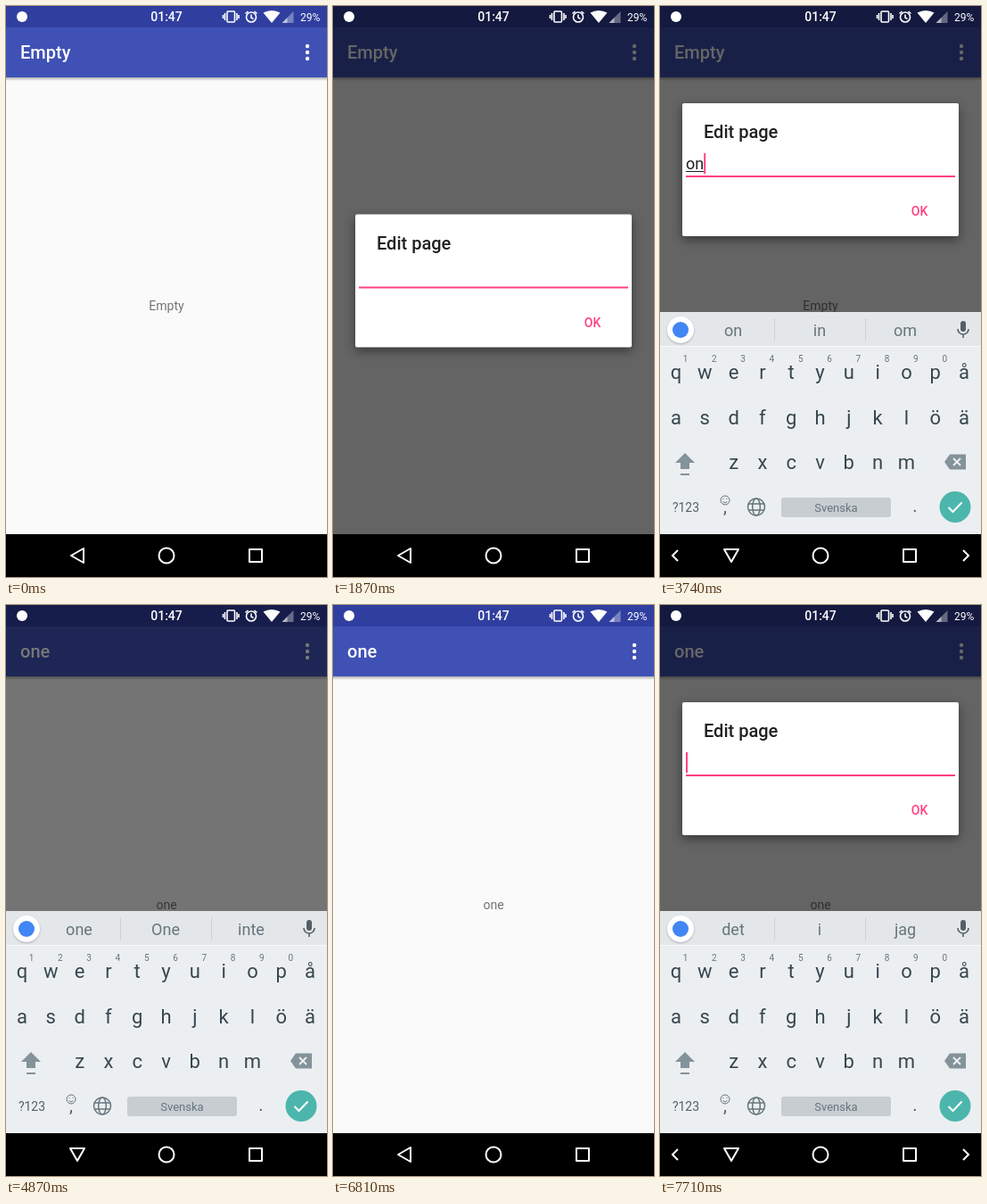
An HTML page for the animation above (8 s loop, 360 px wide and 640 px high).

```html
<!DOCTYPE html>
<html lang="en">
<head>
<meta charset="utf-8">
<title>Edit page</title>
<style>
html, body { margin: 0; width: 100%; height: 100%; overflow: hidden; background: #000; }
svg { display: block; width: 100%; height: 100%; font-family: Roboto, "Noto Sans", sans-serif; }
.mid { text-anchor: middle; }
.bold { font-weight: 500; }
.card { fill: #fff; filter: drop-shadow(0 4px 6px rgba(0, 0, 0, .45)); }
.line { fill: none; stroke-width: 2; stroke-linejoin: round; }
</style>
</head>
<body>
<svg viewBox="0 0 360 640" xmlns="http://www.w3.org/2000/svg">
  <defs>
    <linearGradient id="drop" x1="0" y1="0" x2="0" y2="1">
      <stop offset="0" stop-opacity=".3"/><stop offset="1" stop-opacity="0"/>
    </linearGradient>
  </defs>

  <rect width="360" height="592" fill="#fafafa"/>
  <rect y="80" width="360" height="4" fill="url(#drop)"/>
  <rect y="24" width="360" height="56" fill="#3f51b5"/>
  <rect width="360" height="24" fill="#303f9f"/>
  <g fill="#fff">
    <text id="title" class="bold" x="16" y="59" font-size="20"></text>
    <circle cx="338" cy="45" r="2.2"/><circle cx="338" cy="52" r="2.2"/><circle cx="338" cy="59" r="2.2"/>
  </g>
  <text id="label" class="mid" x="180" y="341" font-size="14" fill="#737373"></text>

  <g id="menu">
    <rect class="card" x="160" y="30" width="196" height="230" rx="2"/>
    <text x="176" y="67" font-size="16" fill="#212121">Edit page</text>
  </g>

  <rect id="scrim" width="360" height="592"/>

  <g id="dialog">
    <rect class="card" x="25" y="109" width="310" height="149" rx="2"/>
    <text class="bold" x="49" y="148" font-size="20" fill="#212121">Edit page</text>
    <text id="typed" x="29" y="183" font-size="18" fill="#212121"></text>
    <rect id="under" x="29" y="185" height="1" fill="#212121"/>
    <rect id="caret" y="165" width="2" height="23" fill="#ff4081"/>
    <rect x="29" y="190" width="302" height="2" fill="#ff4081"/>
    <rect id="ripple" x="267" y="212" width="48" height="36" rx="2" opacity=".15"/>
    <text class="mid bold" x="291" y="235" font-size="14" fill="#ff4081">OK</text>
  </g>

  <g id="board">
    <rect y="343" width="360" height="249" fill="#eceff1"/>
    <rect y="343" width="360" height="38" fill="#e4e7e9"/>
    <rect y="381" width="360" height="1" fill="#f8f9fa"/>
    <path d="M128.5 350v25M230.5 350v25" stroke="#cbd0d3"/>
    <circle cx="23" cy="363" r="15" fill="#fff" style="filter:drop-shadow(0 1px 1px rgba(0,0,0,.25))"/>
    <circle cx="23" cy="363" r="9" fill="#4285f4"/>
    <g id="hints" class="mid" font-size="18" fill="#66757d">
      <text x="82" y="370"></text><text x="179" y="370"></text><text x="275" y="370"></text>
    </g>
    <g fill="#546068">
      <rect x="337" y="353" width="6" height="12" rx="3"/>
      <path d="M334 362a6 6 0 0 0 12 0M340 368v4" class="line" stroke="#546068" style="stroke-width:1.6"/>
    </g>
    <g id="keys" class="mid" font-size="22" fill="#37474f"></g>
    <g fill="#84929a">
      <path d="M28 501l11 11h-6v7h-10v-7h-6zM23 524h10v2h-10z"/>
      <path d="M319 511l6-8.5h18v17h-18z"/>
      <path d="M329 507l8 8m0-8l-8 8" stroke="#eceff1" stroke-width="2"/>
    </g>
    <g class="mid" fill="#546068">
      <text x="29" y="567" font-size="14">?123</text>
      <text x="73" y="568" font-size="20">,</text>
      <text x="286" y="567" font-size="20">.</text>
    </g>
    <g class="line" stroke="#66757d" style="stroke-width:1">
      <circle cx="73" cy="554" r="5"/><path d="M70.5 555.5q2.5 3 5 0M71 552v1M75 552v1"/>
      <g stroke-width="1.5"><circle cx="108" cy="561.5" r="9.5"/><ellipse cx="108" cy="561.5" rx="4.3" ry="9.5"/><path d="M99.5 558h17M99.5 565h17"/></g>
    </g>
    <rect x="136" y="551" width="123" height="22" rx="3" fill="#c7cdd1"/>
    <text class="mid" x="197.5" y="567" font-size="13" fill="#66757d">Svenska</text>
    <circle cx="331" cy="561.5" r="17.5" fill="#4db6ac"/>
    <path class="line" d="M323.5 562l5 5 10-10.5" stroke="#fff"/>
    <g id="press" class="mid">
      <rect x="-16" y="-33" width="32" height="52" rx="2" fill="#d3d8db"/>
      <rect x="-18" y="-84" width="36" height="50" rx="2" fill="#fafafa" style="filter:drop-shadow(0 1px 2px rgba(0,0,0,.3))"/>
      <text y="-51" font-size="26" fill="#37474f"></text>
      <text font-size="22" fill="#37474f"></text>
    </g>
  </g>

  <g fill="#fff">
    <circle cx="18" cy="12" r="6"/>
    <text class="mid bold" x="180" y="17" font-size="14">01:47</text>
    <text x="330" y="16.5" font-size="12">29%</text>
    <g class="line" stroke="#fff" style="stroke-width:1.6">
      <rect x="248" y="6" width="8.5" height="12" rx="1"/>
      <path d="M245.5 8v8M243.5 10v4M259 8v8M261 10v4"/>
      <circle cx="275" cy="12.5" r="5.5"/><path d="M275 9.5v3.5l2.5 1.5M268.5 8.5l3-2.5M281.5 8.5l-3-2.5"/>
    </g>
    <path d="M298 19l-9.5-11.5q9.5-5 19 0z"/>
    <path d="M322.5 6v13h-13z" opacity=".35"/>
    <path d="M315.5 13v6h-6z" opacity=".5"/>
  </g>

  <rect y="592" width="360" height="48"/>
  <g class="line" stroke="#fff">
    <path id="back" d="M73 616l14-8v16z"/>
    <circle cx="180" cy="616" r="8.5"/>
    <rect x="273" y="609" width="14" height="14"/>
    <path id="arrows" d="M20 610l-6 6 6 6M340 610l6 6-6 6"/>
  </g>
</svg>
<script>
const LOOP = 8000, STEP = 75;
const $ = id => document.getElementById(id);
const set = (id, attrs) => { for (const k in attrs) $(id).setAttribute(k, attrs[k]); };
const show = (id, on) => set(id, { visibility: on ? 'visible' : 'hidden' });
const ramp = (t, a, b) => Math.min(1, Math.max(0, (t - a) / (b - a)));
const ease = k => k * k * (3 - 2 * k);
const within = (t, a, b) => t >= a && t < b;

// Letter keys: row text, first column, baseline
const keyX = col => 18 + 32.3 * col;
const spots = {};
let keys = '';
[['qwertyuiopå', 0, 418], ['asdfghjklöä', 0, 468.5], ['zxcvbnm', 2, 519]].forEach(([row, first, y], r) => {
  [...row].forEach((c, i) => {
    const x = keyX(first + i);
    spots[c] = [x, y];
    keys += `<text x="${x}" y="${y}">${c}</text>`;
    if (!r && i < 10) keys += `<text x="${x + 10.5}" y="399" font-size="10" fill="#66757d">${(i + 1) % 10}</text>`;
  });
});
$('keys').innerHTML = keys;

const word = 'one', taps = [3000, 3450, 3975], ready = [3225, 3750, 4200];
const hints = [['det', 'i', 'jag'], ['o', 'och', 'om'], ['on', 'in', 'om'], ['one', 'One', 'inte']];
const passed = (list, t) => list.filter(v => t >= v).length;

function draw(t) {
  const second = t >= 5900;
  $('title').textContent = $('label').textContent = t < 4725 ? 'Empty' : word;

  const shade = second ? ramp(t, 6825, 7050) : ramp(t, 1650, 1875) - ramp(t, 4800, 5025) ** 2;
  set('scrim', { opacity: .6 * shade });

  const open = second ? ramp(t, 5925, 6300) : ramp(t, 675, 900);
  const shut = second ? ramp(t, 6525, 6675) : ramp(t, 1275, 1575);
  const size = .4 + .6 * ease(open);
  set('menu', { opacity: open * (1 - shut), transform: `translate(356 30) scale(${size}) translate(-356 -30)` });

  const fade = second ? ramp(t, 6825, 7050) : ramp(t, 1650, 1875) - ramp(t, 4575, 4800);
  const lift = ease(second ? ramp(t, 7425, 7575) : ramp(t, 2025, 2325));
  const zoom = .9 + .1 * fade;
  set('dialog', {
    opacity: fade,
    transform: `translate(180 ${183.5 + 124.5 * (1 - lift)}) scale(${zoom}) translate(-180 -183.5)`
  });
  const count = second ? 0 : passed(taps.map(v => v + STEP), t);
  $('typed').textContent = word.slice(0, count);
  const width = count ? $('typed').getComputedTextLength() : 0;
  set('under', { width });
  set('caret', { x: 29 + width });
  show('caret', within(t, 2550, 4800) || t >= 7275);
  show('ripple', within(t, 4575, 4800));

  const slide = second ? ramp(t, 7500, 7725) : ramp(t, 2400, 2550) - ramp(t, 4875, 5025);
  set('board', { transform: `translate(0 ${250 * (1 - ease(slide))})` });
  const row = hints[second ? 0 : passed(ready, t)];
  [...$('hints').children].forEach((el, i) => el.textContent = row[i]);

  const hit = taps.findIndex(v => within(t, v, v + 2 * STEP));
  show('press', hit >= 0);
  if (hit >= 0) {
    set('press', { transform: `translate(${spots[word[hit]]})` });
    $('press').querySelectorAll('text').forEach(el => el.textContent = word[hit]);
  }

  const turn = second ? ramp(t, 7500, 7725) : ramp(t, 2265, 2550) - ramp(t, 4875, 5025);
  set('back', { transform: `rotate(${-90 * turn} 80 616)` });
  show('arrows', within(t, 2100, 4800) || t >= 7500);
}

function tick() {
  const t = performance.now() % LOOP;
  draw(Math.floor((t + 15) / STEP) * STEP);
  requestAnimationFrame(tick);
}
tick();
</script>
</body>
</html>
```
